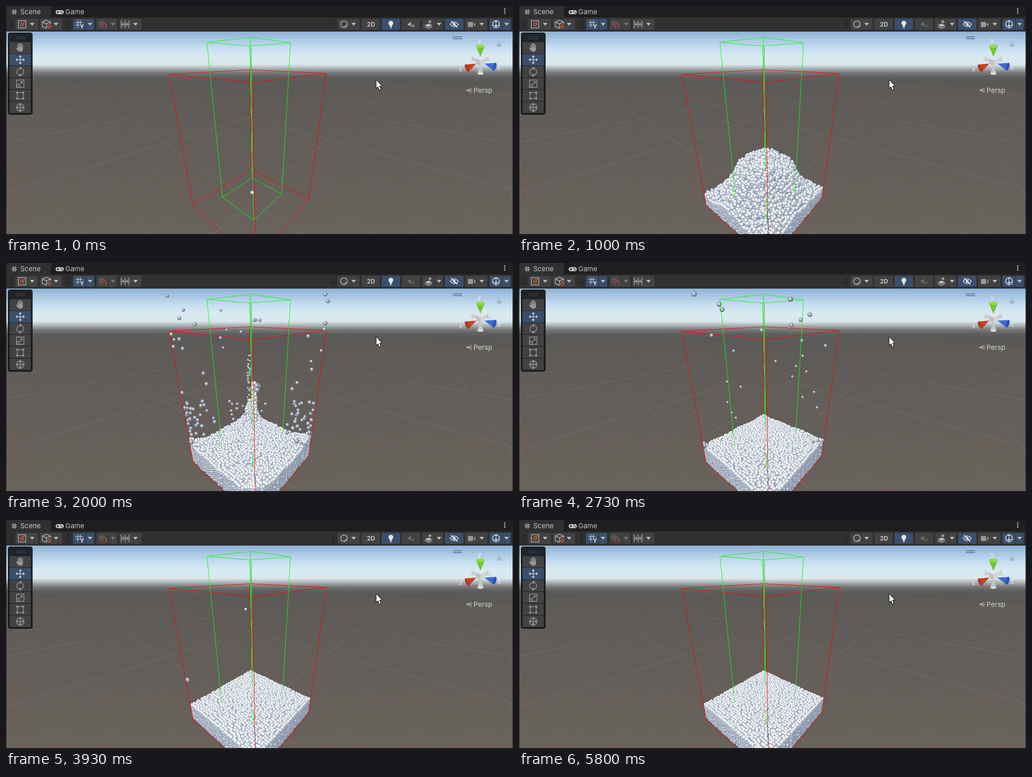
An HTML page with a canvas for the animation above (5870 ms loop, 1104 by 501 pixels).

```html
<!DOCTYPE html>
<html lang="en">
<head>
<meta charset="utf-8">
<title>Fluid particles</title>
<style>
html, body { margin: 0; width: 100%; height: 100%; overflow: hidden; background: #191919; }
canvas { display: block; }
</style>
</head>
<body>
<canvas id="stage" width="1104" height="501"></canvas>
<script>
const W = 1104, H = 501, LOOP = 5870, FPS = 15, LAST = 87;
const TAU = Math.PI * 2;
let g = document.getElementById('stage').getContext('2d');

const clamp = (x, a = 0, b = 1) => Math.min(b, Math.max(a, x));
const mix = (a, b, k) => a + (b - a) * k;
const smooth = (a, b, x) => { const k = clamp((x - a) / (b - a)); return k * k * (3 - 2 * k); };
const rnd = (a, b = 0) => { const s = Math.sin(a * 127.1 + b * 311.7 + 3.3) * 43758.5453; return s - Math.floor(s); };

function layer(w, h, draw) {
  const c = document.createElement('canvas');
  c.width = w; c.height = h;
  const keep = g;
  g = c.getContext('2d');
  draw();
  g = keep;
  return c;
}
function inScene(draw) {
  g.save();
  g.beginPath(); g.rect(1, 56, 1102, 443); g.clip();
  draw();
  g.restore();
}
function box(x, y, w, h, color, r = 0) {
  g.fillStyle = color;
  g.beginPath(); g.roundRect(x, y, w, h, r); g.fill();
}
function frame(x, y, s, color, width = 1.4) {
  g.strokeStyle = color; g.lineWidth = width;
  g.strokeRect(x - s, y - s, 2 * s, 2 * s);
}
function line(color, width, ...pts) {
  g.strokeStyle = color; g.lineWidth = width;
  g.beginPath();
  for (let i = 0; i < pts.length; i += 2) g.lineTo(pts[i], pts[i + 1]);
  g.stroke();
}
function poly(color, ...pts) {
  g.fillStyle = color;
  g.beginPath();
  for (let i = 0; i < pts.length; i += 2) g.lineTo(pts[i], pts[i + 1]);
  g.fill();
}
function arc(color, width, x, y, r, a = 0, b = TAU) {
  g.strokeStyle = color; g.lineWidth = width;
  g.beginPath(); g.arc(x, y, r, a, b); g.stroke();
}
function oval(color, x, y, rx, ry = rx, turn = 0) {
  g.fillStyle = color;
  g.beginPath(); g.ellipse(x, y, rx, ry, turn, 0, TAU); g.fill();
}
function label(str, x, y, color, size = 15, weight = 400) {
  g.font = `${weight} ${size}px Inter, Roboto, sans-serif`;
  g.fillStyle = color;
  g.fillText(str, x, y);
}
function fill(grad, ...colors) {
  colors.forEach((c, i) => grad.addColorStop(i / (colors.length - 1), c));
  return grad;
}

// Perspective of the red container: u to the right, v to the left, h up.
function project(u, v, h) {
  const w = 1 - .2133 * u - .2555 * v - .202 * h;
  return [(533 - 14.6 * u - 230 * v - 110.1 * h) / w, (357 - 25 * u - 32.4 * v - 245.1 * h) / w, w];
}

/* ---------- static editor picture ---------- */

const ICON = '#b9b9b9', DIM = '#989898', LIT = '#e4e4e4', BTN = '#424242', BLUE = '#3a4f6c', RUST = '#cf5640';

function drawGround() {
  g.fillStyle = fill(g.createLinearGradient(0, 56, 0, 128), '#8fb1d5', '#abc8e4', '#c6def0', '#d8eaf3', '#d9e7eb');
  g.fillRect(1, 56, 1102, 72);
  g.fillStyle = fill(g.createLinearGradient(0, 128, 0, 164), '#d9e7eb', '#a9b1b3', '#767879', '#5f5e5d', '#5a5856');
  g.fillRect(1, 128, 1102, 36);
  g.fillStyle = fill(g.createLinearGradient(0, 164, 0, 499), '#5a5856', '#625d59', '#665f5a', '#69635d');
  g.fillRect(1, 164, 1102, 335);

  const fade = a => fill(g.createLinearGradient(0, 145, 0, 330), ...[0, .5, .8, 1].map(k => `rgba(150,150,148,${a * k})`));
  const minor = fade(.12), major = fade(.34);
  for (let n = -36; n <= 36; n++) {
    const c = n * .5 + .5, style = n % 5 ? minor : major;
    const [ax, ay] = project(c, -50, 0), [bx, by] = project(c, (.94 - .2133 * c) / .2555, 0);
    const [cx, cy] = project(-50, c, 0), [dx, dy] = project((.94 - .2555 * c) / .2133, c, 0);
    line(style, 1, ax, ay, bx, by);
    line(style, 1, cx, cy, dx, dy);
  }
}

const caret = (x, color = '#c0c0c0') => poly(color, x - 5, 37, x + 5, 37, x, 43);
const button = (x, w, color = BTN) => box(x, 28, w, 24, color, 2);
function grip(x) { for (const d of [0, 4]) line('#1f1f1f', 1.2, x + d, 31, x + d, 50); }
function hash(x, y, s, color, w = 1.3) {
  for (const d of [-s / 3, s / 3]) {
    line(color, w, x + d, y - s, x + d, y + s);
    line(color, w, x - s, y + d, x + s, y + d);
  }
}
function arrows(x, y, r, color) {
  line(color, 1.4, x - r, y, x + r, y);
  line(color, 1.4, x, y - r, x, y + r);
  for (let i = 0; i < 4; i++) {
    g.save(); g.translate(x, y); g.rotate(i * TAU / 4);
    poly(color, r + 2, 0, r - 2, -3.5, r - 2, 3.5);
    g.restore();
  }
}

function drawTabs() {
  box(0, 0, W, 25, '#1f1f1f');
  box(1, 0, 97, 26, '#303030', [4, 4, 0, 0]);
  box(1, 25, 1102, 31, '#303030');
  hash(18, 13, 6, '#c0c0c0');
  label('Scene', 31, 18, '#c4c4c4');
  box(108, 9, 18, 9, '#c0c0c0', 4.5);
  line('#1f1f1f', 1.4, 110.5, 13.5, 115.5, 13.5); line('#1f1f1f', 1.4, 113, 11, 113, 16);
  oval('#1f1f1f', 120, 12, 1.2); oval('#1f1f1f', 122.5, 15, 1.2);
  label('Game', 129, 18, '#c4c4c4');
  for (let i = 0; i < 3; i++) oval('#c4c4c4', 1086, 6.5 + 4.5 * i, 1.5);
}

function drawLeftBar() {
  grip(9.5); grip(134.5);
  button(21, 49); caret(57);
  frame(35, 40, 8, ICON); arc(RUST, 2, 35, 40, 3.2); line(RUST, 1.6, 37, 38, 41, 34);

  button(74, 48); caret(109);
  line(ICON, 1.4, 88, 49, 79, 45, 79, 35, 88, 31, 97, 35, 97, 39);
  line(ICON, 1.4, 79, 35, 88, 39, 97, 35); line(ICON, 1.4, 88, 39, 88, 49);
  arc(RUST, 2, 94, 45, 3.2);

  button(146, 27, BLUE); button(174, 18, BLUE); caret(183);
  hash(159, 39, 8, '#d5d5d5', 1.2);
  box(161, 39, 10, 11, BLUE); label('Y', 161, 49, '#eee', 12, 700);

  button(197, 26); button(224, 18); caret(233, '#777');
  hash(208, 39, 7, '#707070', 1.2);
  box(208, 38, 12, 12, BTN);
  arc('#9a4a3c', 2.6, 214, 43, 4, Math.PI, TAU);
  for (const x of [210, 218]) line('#9a4a3c', 2.6, x, 43, x, 48);

  button(247, 48); caret(282);
  for (let i = 0; i < 5; i++) {
    const x = 251 + i * 4.2, s = i % 2 ? 4 : 8;
    line(ICON, 1.4, x, 40 - s, x, 40 + s);
  }
  line(ICON, 1.2, 251, 40, 268, 40);
}

function drawRightBar() {
  grip(710.5);
  button(722, 48); caret(757);
  arc(ICON, 1.6, 736, 40, 7.2); arc('#8a8a8a', 2, 736, 40, 5, .2, 1.8);

  button(774, 40); label('2D', 786, 45, '#c4c4c4', 13, 700);

  button(818, 40, BLUE);
  oval(LIT, 838, 37.5, 5.2); box(835.5, 41, 5, 4.5, LIT); box(836, 46.5, 4, 2, LIT, 1);

  button(862, 40);
  button(906, 28); button(935, 17); caret(943);
  poly(ICON, 912, 42, 920, 38.5, 928, 42, 920, 46);
  line(ICON, 1.4, 912, 45, 920, 49, 928, 45);
  line(ICON, 1.8, 923, 31, 923, 38); line(ICON, 1.8, 919.5, 34.5, 926.5, 34.5);

  button(956, 40, BLUE);
  g.strokeStyle = LIT; g.lineWidth = 1.6;
  g.beginPath(); g.moveTo(967, 40); g.quadraticCurveTo(976, 30, 985, 40); g.quadraticCurveTo(976, 50, 967, 40); g.stroke();
  oval(LIT, 976, 40, 3); line(LIT, 1.8, 969, 33, 983, 47);

  button(1000, 48); caret(1036);
  box(1006, 35, 11, 11, DIM, 1); poly(DIM, 1018, 40.5, 1022, 36, 1022, 45);

  button(1053, 27, BLUE); button(1081, 18, BLUE); caret(1090);
  arc(LIT, 1.5, 1067, 40, 7.5);
  line(LIT, 1.2, 1060, 42, 1067, 44, 1075, 41); line(LIT, 1.2, 1067, 31, 1067, 49);
  oval(LIT, 1067, 43, 2); oval(LIT, 1067, 33, 1.8);
}

function drawTools() {
  const x = 31;
  box(4, 58, 54, 180, 'rgba(24,26,28,.94)', 5);
  for (const y of [67.5, 71.5]) {
    line('#3c536c', 1, 21, y, 42, y);
    line('#28507c', 1.2, 973, y, 993, y);
  }
  for (let i = 0; i < 6; i++) box(8, 79 + i * 26, 46, 25, i === 1 ? BLUE : BTN, i ? 1 : 3);

  oval(DIM, x + .5, 95, 5.5, 5);
  g.lineCap = 'round';
  for (let i = 0; i < 4; i++) {
    const d = (i - 1.5) * 3.2;
    line(DIM, 2.3, x + d * .9, 95, x + d, 82 + d * d / 7);
  }
  line(DIM, 2.3, x - 4, 97, x - 8, 92);
  g.lineCap = 'butt';
  arrows(x, 117.5, 8, '#cfd3d8');
  arc(DIM, 1.6, x, 144, 7.5, 2.3, 4.9); arc(DIM, 1.6, x, 144, 7.5, 5.4, 8);
  poly(DIM, 30, 133, 36, 136, 30, 140); poly(DIM, 32, 148, 26, 151, 32, 155);
  frame(x, 170, 8, DIM, 1.5); frame(26, 175, 3, DIM, 1.5);
  line(DIM, 1.4, 30, 171, 35, 166); poly(DIM, 36, 165, 36, 170, 31, 165);
  frame(x, 196, 6.5, DIM, 1.3);
  for (const a of [22.5, 35.5]) for (const b of [187.5, 200.5]) box(a, b, 4, 4, DIM);
  arc(DIM, 1.3, x, 222, 8.5); arrows(x, 222, 6.5, DIM);
}

function cone(tx, ty, bx, by, r, side, base) {
  const a = Math.atan2(by - ty, bx - tx), nx = -Math.sin(a) * r, ny = Math.cos(a) * r;
  poly(side, tx, ty, bx + nx, by + ny, bx - nx, by - ny);
  oval(base, bx, by, r * .4, r, a);
}
function drawGizmo() {
  cone(1031, 121, 1012, 115, 6, '#c9cdcf', '#dfe2e3');
  cone(1036, 121, 1053, 115, 6, '#c9cdcf', '#dfe2e3');
  cone(1033, 124, 1033, 148, 6.5, '#c4c4c4', '#dedede');
  poly('#e3e5e6', 1023, 115, 1033, 111, 1044, 115, 1033, 119);
  poly('#bfc2c4', 1023, 115, 1033, 119, 1033, 131, 1024, 126);
  poly('#d2d4d6', 1044, 115, 1033, 119, 1033, 131, 1043, 126);
  cone(1033, 111, 1033, 88, 9.5, '#72c62c', '#8fdd4c');
  cone(1024, 126, 1004, 136, 9, '#c64428', '#a83c27');
  cone(1042, 126, 1064, 133, 9, '#3b6bd4', '#2c56b4');
  label('y', 1027, 80, '#eceef0', 14);
  label('x', 986, 143, '#e4e4e4', 14);
  label('z', 1070, 139, '#e4e4e4', 14);
  box(1069, 82, 10, 7, 'rgba(160,172,178,.7)', 1);
  arc('rgba(160,172,178,.7)', 1.3, 1074, 81, 3, Math.PI, TAU);
  line('#c6c6c6', 1.2, 1014, 180, 1003, 184.5, 1014, 189);
  line('#c6c6c6', 1.2, 1003, 184.5, 1015, 184.5);
  label('Persp', 1018, 190, '#d2d2d2');
}
function drawCursor() {
  const shape = [806, 161, 806, 180.5, 810, 177, 813, 184, 816.5, 182.5, 813.5, 175.5, 818.5, 175];
  poly('#fff', ...shape);
  line('#111', 1.1, ...shape, 806, 161);
}
function drawSpeaker(color) {
  poly(color, 875, 38, 878, 38, 882, 34, 882, 46, 878, 42, 875, 42);
  line(color, 1.5, 884, 41, 889, 46); line(color, 1.5, 889, 41, 884, 46);
}

const backdrop = layer(W, H, () => {
  box(0, 0, W, H, '#191919');
  inScene(drawGround);
  drawTabs(); drawLeftBar(); drawRightBar();
  drawTools(); drawGizmo(); drawCursor();
});

/* ---------- wire boxes, corners in the order left, back, right, front ---------- */

const RED = '#ff0000', GREEN = '#00ff00';
const red = { color: RED, top: [[354, 149], [530, 139], [697, 147], [537, 167]], low: [[407, 436], [533, 357], [659, 422], [543, 564]] };
const green = { color: GREEN, top: [[437, 79], [532, 68], [619, 80], [530, 87]], low: [[471, 418], [535, 376], [600, 411], [539, 468]] };

// Hard one-pixel line without smoothing.
function hard(color, [ax, ay], [bx, by]) {
  const n = Math.ceil(Math.max(Math.abs(bx - ax), Math.abs(by - ay), 1));
  g.fillStyle = color;
  for (let i = 0; i <= n; i++) g.fillRect(Math.round(mix(ax, bx, i / n)), Math.round(mix(ay, by, i / n)), 1, 1);
}
function ring(pts, color) { pts.forEach((p, i) => hard(color, p, pts[(i + 1) % 4])); }
function post(b, i, y0 = 0, y1 = 600, color = b.color) {
  const [ax, ay] = b.top[i], [bx, by] = b.low[i];
  const at = y => [mix(ax, bx, (y - ay) / (by - ay)), y];
  hard(color, at(clamp(y0, ay, by)), at(clamp(y1, ay, by)));
}
function allWires() {
  for (const b of [red, green]) {
    ring(b.top, b.color); ring(b.low, b.color);
    for (let i = 0; i < 4; i++) post(b, i);
  }
  hard('#8c8c86', [534, 90], [537, 405]);
}
function frontWires(t) {
  const wet = t > .95, deep = t > 1.5 ? 20 : 0;
  post(green, 0, 0, wet ? 382 : 418);
  post(green, 2, 0, wet ? 372 : 411);
  post(green, 3, 0, wet ? 362 : 468);
  if (wet) {
    post(green, 0, 388, 418 - deep);
    post(green, 2, 386, 411 - deep);
    post(green, 3, 417, 468 - deep);
  }
  post(red, 0); post(red, 2);
  post(red, 3, 0, 450); post(red, 3, 450, 488, '#6a2a30'); post(red, 3, 488);
  hard(RED, red.low[0], red.low[3]); hard(RED, red.low[3], red.low[2]);
}

/* ---------- fluid ---------- */

const sphere = (...colors) => layer(48, 48, () => oval(fill(g.createRadialGradient(18, 14, 1, 23, 23, 25), ...colors), 24, 24, 23.5));
const topBall = sphere('#ffffff', '#fbfcfd', '#e6e9ee', '#b4becb', '#7d8b9f');
const sideBall = sphere('#ffffff', '#eceff3', '#c8cfd9', '#98a4b5', '#717f94');
const drop = sphere('#eef0f3', '#d0d5dd', '#a4acb8', '#7a8492', '#5a626e');
const put = (img, x, y, r) => g.drawImage(img, x - r, y - r, 2 * r, 2 * r);

const N = 34, PITCH = .0185;

// Height of the surface above the floor; 0 where there is no fluid.
function surface(u, v, t) {
  const a = u - .5, b = v - .5, far = Math.max(Math.abs(a), Math.abs(b));
  if (t < .32) return far < .25 ? 1.13 : 0;
  const fall = Math.min(t - 1 / 3, 2 / 3), s = fall * 1.5, e = s * s;
  const r = Math.hypot(a, b), toe = .095 * s;
  const peak = (1.13 - 1.6 * fall * fall - toe) * (1 - smooth(1, 1.4, t));
  const f = 1 - smooth(mix(.249, .14, e), mix(.25, .6, e), mix(far, r, s));
  if (f <= 0 && (fall < .22 || r > .35 + (fall - .2) * .82)) return 0;
  let h = toe + peak * f + .055 * smooth(1, 1.5, t);
  const surge = (.03 + .12 * smooth(1, 1.45, t)) * smooth(.9, 1, t) * (1 - smooth(1.6, 2.7, t));
  for (const cu of [0, 1]) for (const cv of [0, 1]) h += surge * Math.exp(-9 * Math.hypot(u - cu, v - cv));
  const rough = s * (.002 + .016 * Math.exp(-1.3 * Math.max(0, t - 1.3)));
  h += rough * (rnd(u * 50, v * 50) * 2 - 1 + Math.sin(u * 17 + t * 3) * Math.sin(v * 15 - t * 2));
  if (t > 1.5) h -= .025 * Math.exp(-.6 * (t - 1.5)) * Math.sin(3 * t) * Math.cos(Math.PI * u) * Math.cos(Math.PI * v);
  return Math.max(h, .012);
}

function drawFluid(t) {
  const cells = [...Array(N).keys()];
  const tops = cells.map(i => cells.map(j => surface((i + .5) / N, (j + .5) / N, t)));
  const fall = Math.max(0, t - 1 / 3), loose = .65 * clamp(fall * 3);
  const floor = Math.max(.01, .085 - 1.47 * fall * fall);
  const free = k => k === 0 || k === N - 1 ? .25 : 1;
  for (let sum = 0; sum < 2 * N - 1; sum++) {
    for (let i = Math.max(0, sum - N + 1); i <= Math.min(N - 1, sum); i++) {
      const j = sum - i, top = tops[i][j];
      if (!top) continue;
      const next = Math.min(i + 1 < N ? tops[i + 1][j] : 0, j + 1 < N ? tops[i][j + 1] : 0);
      const depth = Math.ceil((top - Math.max(floor, next - 2 * PITCH)) / PITCH);
      const sway = .2 * Math.sin(t * 1.4 + 9 * rnd(i, j));
      for (let m = Math.max(0, depth); m >= 0; m--) {
        const h = top - m * PITCH;
        if (h < floor - .004) continue;
        const du = (rnd(i + m * 7, j) - .5 + sway) * loose * free(i);
        const dv = (rnd(j + 90, i + m * 5) - .5 - sway) * loose * free(j);
        const [x, y, w] = project((i + .5 + du) / N, (j + .5 + dv) / N, h);
        if (y < 515) put(m ? sideBall : topBall, x, y, 2.6 / w);
      }
    }
  }
}

/* ---------- droplets: parabolas on the screen through a point at a given time ---------- */

const GRAV = 700, SPLASH = 2, LATE = 41 / FPS;
const drops = [];
const leftWall = y => 354 + (y - 149) * .185 + 4;
const rightWall = y => 697 - (y - 147) * .138 - 4;

function splash(x, y, r, img = drop) {
  const k = rnd(x, y);
  const vy = y < 150 ? -370 - 60 * k : (200 - y) / .73 + 60 * k;
  drops.push({ at: SPLASH, x, y, r: r * mix(.85, 1.15, k), vy, img });
}
// Droplets between two heights; place(y, k) gives x for a random k.
function spray(count, seed, y0, y1, r, place, img) {
  for (let n = 0; n < count; n++) {
    const y = mix(y0, y1, rnd(n, seed));
    splash(place(y, rnd(n, seed + 1)), y, r, img);
  }
}
const nearLeft = (y, k) => leftWall(y) + 60 * k * k;
const nearRight = (y, k) => rightWall(y) - 52 * k * k;
spray(12, 11, 70, 290, 4.2, nearLeft);
spray(32, 15, 300, 376, 4.2, nearLeft);
spray(10, 21, 60, 290, 4.2, nearRight);
spray(32, 25, 302, 374, 4.2, nearRight);
spray(8, 31, 85, 215, 3.4, (y, k) => 465 + 110 * k);
spray(14, 35, 298, 345, 3.4, (y, k) => 484 + 86 * k);
spray(34, 41, 202, 330, 2.9, (y, k) => 526 + 6 * k);
spray(110, 45, 300, 350, 3.2, (y, k) => 534 + (k - .5) * mix(10, 46, (y - 300) / 50), topBall);
spray(85, 51, 262, 350, 4.3, (y, k) => 536 + 8 * k, topBall);
spray(4, 55, 264, 282, 5.4, (y, k) => 543 + 12 * k);

for (let n = 0; n < 25; n++) {
  const y = mix(68, 350, n / 25), k = rnd(n, 62);
  const x = mix(leftWall(y), rightWall(y), .1 + .87 * rnd(n, 61));
  drops.push({ at: LATE, x, y, r: mix(5.8, 3.2, smooth(60, 240, y)), vy: (y - 200) / .73 - 20 * k, img: drop });
}
drops.push({ at: 59 / FPS, x: 522, y: 195, r: 2.7, vy: 1080, img: topBall });

function drawDrops(t) {
  if (t <= 1) return;
  for (const d of drops) {
    const s = t - d.at, y = d.y + d.vy * s + GRAV / 2 * s * s;
    const x = clamp(d.x, leftWall(y), rightWall(y));
    if (y < 340 + Math.abs(x - 533) * .5) put(d.img, x, y, d.r);
  }
}

/* ---------- playback ---------- */

function render(k) {
  const t = k / FPS;
  g.drawImage(backdrop, 0, 0);
  drawSpeaker(k < 5 ? '#b0b0b0' : '#6c6c6c');
  inScene(() => {
    allWires();
    const glow = g.createRadialGradient(536, 408, 1, 536, 408, 5);
    oval(fill(glow, 'rgba(245,245,245,.95)', 'rgba(225,225,225,.75)', 'rgba(200,200,200,0)'), 536, 408, 5);
    if (k === 0) return;
    drawFluid(t);
    drawDrops(t);
    frontWires(t);
  });
}

const start = performance.now();
let shown = -1;
function tick() {
  const t = (performance.now() - start) % LOOP;
  const k = Math.min(LAST, Math.floor(t * FPS / 1000 + .06));
  if (k !== shown) render(shown = k);
  requestAnimationFrame(tick);
}
tick();
</script>
</body>
</html>
```
